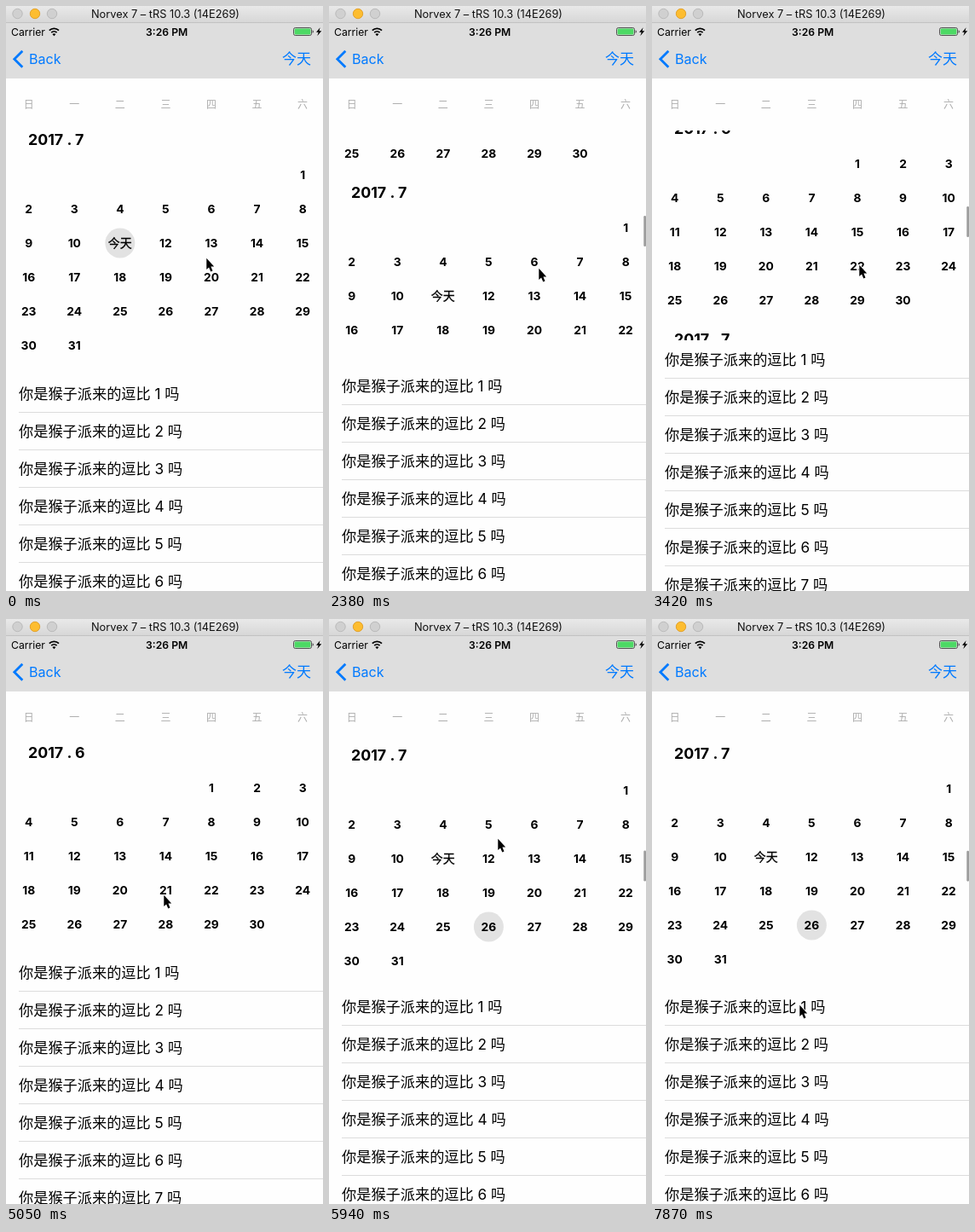
These frames come from a looping animation (372x686 px, 8 s). An HTML page:

```html
<!DOCTYPE html>
<html lang="zh-CN">
<head>
<meta charset="utf-8">
<title>Calendar</title>
<style>
html, body { margin: 0; width: 100%; height: 100%; overflow: hidden; background: #fefefe; }
svg { display: block; font-family: Inter, "Noto Sans CJK SC", "Noto Sans CJK", sans-serif; }
.mid { text-anchor: middle; }
.day { font-size: 13.8px; font-weight: 700; text-anchor: middle; }
.today { font-size: 14px; font-weight: 500; text-anchor: middle; stroke: #000; stroke-width: .3px; }
.month { font-size: 17.8px; font-weight: 700; }
.week { font-size: 12px; fill: #adadad; text-anchor: middle; }
.row { font-size: 17.2px; }
</style>
</head>
<body>
<svg id="stage" width="372" height="686" viewBox="0 0 372 686">
  <defs>
    <linearGradient id="chrome" x2="0" y2="1">
      <stop stop-color="#e9e9e9"/><stop offset="1" stop-color="#d6d6d6"/>
    </linearGradient>
    <clipPath id="view"><rect id="viewBox" y="146" width="372" height="287"/></clipPath>
  </defs>
  <rect width="372" height="686" fill="#fefefe"/>

  <g clip-path="url(#view)">
    <g id="calendar"><circle id="mark" r="17.5" fill="#e2e2e2"/></g>
  </g>
  <g id="list"><rect width="372" height="400" fill="#fefefe"/></g>
  <rect id="bar" x="369.3" width="2.7" height="36" rx="1.3" fill="#9c9c9c"/>
  <g id="week"></g>

  <rect y="19" width="372" height="66" fill="#dedede"/>
  <rect width="372" height="20" fill="url(#chrome)"/>
  <rect y="19" width="372" height="1" fill="#c2c2c2"/>
  <g stroke-width="1">
    <circle cx="13.5" cy="9" r="5.7" fill="#d0d0d0" stroke="#bababa"/>
    <circle cx="34" cy="9" r="5.7" fill="#fdbd30" stroke="#e2a22c"/>
    <circle cx="54" cy="9" r="5.7" fill="#d0d0d0" stroke="#bababa"/>
  </g>
  <text class="mid" x="187" y="14" font-size="12.8" fill="#111">Norvex 7 – tRS 10.3 (14E269)</text>

  <text x="6" y="34.5" font-size="12.2">Carrier</text>
  <g fill="none" stroke="#000" stroke-width="1.8">
    <path d="M50.8 28.7a8 8 0 0 1 11.2 0M53.2 31.2a4.6 4.6 0 0 1 6.4 0"/>
  </g>
  <path d="M56.4 35.2l-2-2.1a2.9 2.9 0 0 1 4 0z"/>
  <text class="mid" x="188.7" y="34.5" font-size="12.2" font-weight="600">3:26 PM</text>
  <rect x="337.5" y="25.5" width="21" height="9" rx="2" fill="#dedede" stroke="#333" stroke-width=".8"/>
  <rect x="338.6" y="26.6" width="18.8" height="6.8" rx="1" fill="#4cd964"/>
  <path d="M359.7 28.3a2 2 0 0 1 0 3.6z" fill="#333"/>
  <path d="M368.6 25.2l-4.6 5.6h2.7l-1.4 4.2 5-5.8h-2.8z"/>

  <path d="M19.3 52.8L9.8 62.3l9.5 9.5" fill="none" stroke="#007aff" stroke-width="2.8"/>
  <text x="27" y="68" font-size="16.1" fill="#007aff">Back</text>
  <text x="324" y="68.3" font-size="17" fill="#007aff">今天</text>

  <path id="cursor" d="M.3 .8V14L3.1 11.4 5.3 16.4 7.5 15.4 5.4 10.6H9.2Z" stroke="#fff" stroke-width="2" paint-order="stroke" stroke-linejoin="round"/>
</svg>
<script>
const LOOP = 8000, TICK = 148.5;
const JULY = 247, AUGUST = 534;            // scroll offsets of the months; June is 0
const SHRINK = 2284, GROW = 5300;          // moments when the calendar height changes
const DRAG = 5050;                         // start of the drag back to July
const $ = id => document.getElementById(id);
const colX = c => 26.7 + c * 53.57;

function add(parent, tag, attrs, text) {
  const el = document.createElementNS('http://www.w3.org/2000/svg', tag);
  for (const k in attrs) el.setAttribute(k, attrs[k]);
  if (text) el.textContent = text;
  parent.appendChild(el);
}

function addMonth(top, number, start, days) {
  const cal = $('calendar');
  add(cal, 'text', { class: 'month', x: 26, y: top + 163.3 }, '2017 . ' + number);
  for (let d = 1; d <= days; d++) {
    const cell = start + d - 1, now = number === 7 && d === 11;
    add(cal, 'text', {
      class: now ? 'today' : 'day',
      x: colX(cell % 7),
      y: top + 203.1 + 40 * Math.floor(cell / 7)
    }, now ? '今天' : String(d));
  }
}

addMonth(0, 6, 4, 30);
addMonth(JULY, 7, 6, 31);
addMonth(AUGUST, 8, 2, 31);
[...'日一二三四五六'].forEach((ch, i) =>
  add($('week'), 'text', { class: 'week', x: colX(i), y: 119.5 }, ch));
for (let i = 0; i < 7; i++) {
  add($('list'), 'text', { class: 'row', x: 15, y: 28.7 + 44 * i }, `你是猴子派来的逗比 ${i + 1} 吗`);
  add($('list'), 'rect', { x: 15, y: 44 + 44 * i, width: 357, height: 1, fill: '#dcdcdc' });
}

const smooth = (t, a, b) => {
  const p = Math.min(1, Math.max(0, (t - a) / (b - a)));
  return p * p * (3 - 2 * p);
};
const between = (t, a, b) => t >= a && t < b;

// time, x, y
const path = [
  [0, 235, 295], [590, 190, 352], [740, 190, 353], [1188, 225, 290],
  [1990, 225, 290], [2290, 246, 307], [2900, 246, 307], [3415, 243, 303],
  [3700, 243, 303], [4300, 187, 322], [4450, 185, 323], [DRAG, 185, 323],
  [GROW, 198, 257], [7000, 198, 257], [7420, 172, 451], [7650, 172, 428],
  [7870, 173, 452]
];

function pointer(t) {
  let i = 1;
  while (i < path.length - 1 && t > path[i][0]) i++;
  const a = path[i - 1], b = path[i], p = smooth(t, a[0], b[0]);
  return [a[1] + (b[1] - a[1]) * p, a[2] + (b[2] - a[2]) * p];
}

// Exponential glide that stops at zero
const glide = (ms, from, rate, cut) => Math.max(0, from * Math.exp(-rate * ms / 1000) - cut);

function scrollAt(t, y) {
  if (t < 2290) return JULY - 18.4 * smooth(t, 1990, 2290);
  if (t < DRAG) return glide(t - 2290, 230.4, 2.439, 1.8);
  if (t < GROW) return 62.2 * smooth(t, DRAG, GROW);
  if (t < 7420) return JULY - glide(t - GROW, 185, 6.36, 0.17);
  return JULY - (y - 451);
}

const move = (id, x, y) => $(id).setAttribute('transform', `translate(${x} ${y})`);

function render(t) {
  const [x, y] = pointer(t);
  const scroll = Math.round(scrollAt(t, y) * 2) / 2;   // half-point steps of the screen
  const small = between(t, SHRINK, GROW);
  const picked = t >= 590;

  move('cursor', Math.round(x), Math.round(y));
  move('calendar', 0, -scroll);
  move('mark', colX(picked ? 3 : 2), JULY + (picked ? 358 : 278));
  const fold = smooth(t, SHRINK, SHRINK + 300) - smooth(t, GROW, GROW + 300);
  move('list', 0, 432 - Math.round(40 * fold));
  $('viewBox').setAttribute('height', small ? 247 : 287);

  const shown = between(t, 2050, 4290) || between(t, 5100, 6380) || t >= 7400;
  $('bar').setAttribute('opacity', shown ? 1 : 0);
  $('bar').setAttribute('y', small ? 235 + 0.064 * (scroll - 13) : 271.5 + 0.076 * (scroll - 244));
}

function frame() {
  const t = performance.now() % LOOP;
  render(Math.floor((t + 10) / TICK) * TICK);
  requestAnimationFrame(frame);
}
frame();
</script>
</body>
</html>
```
